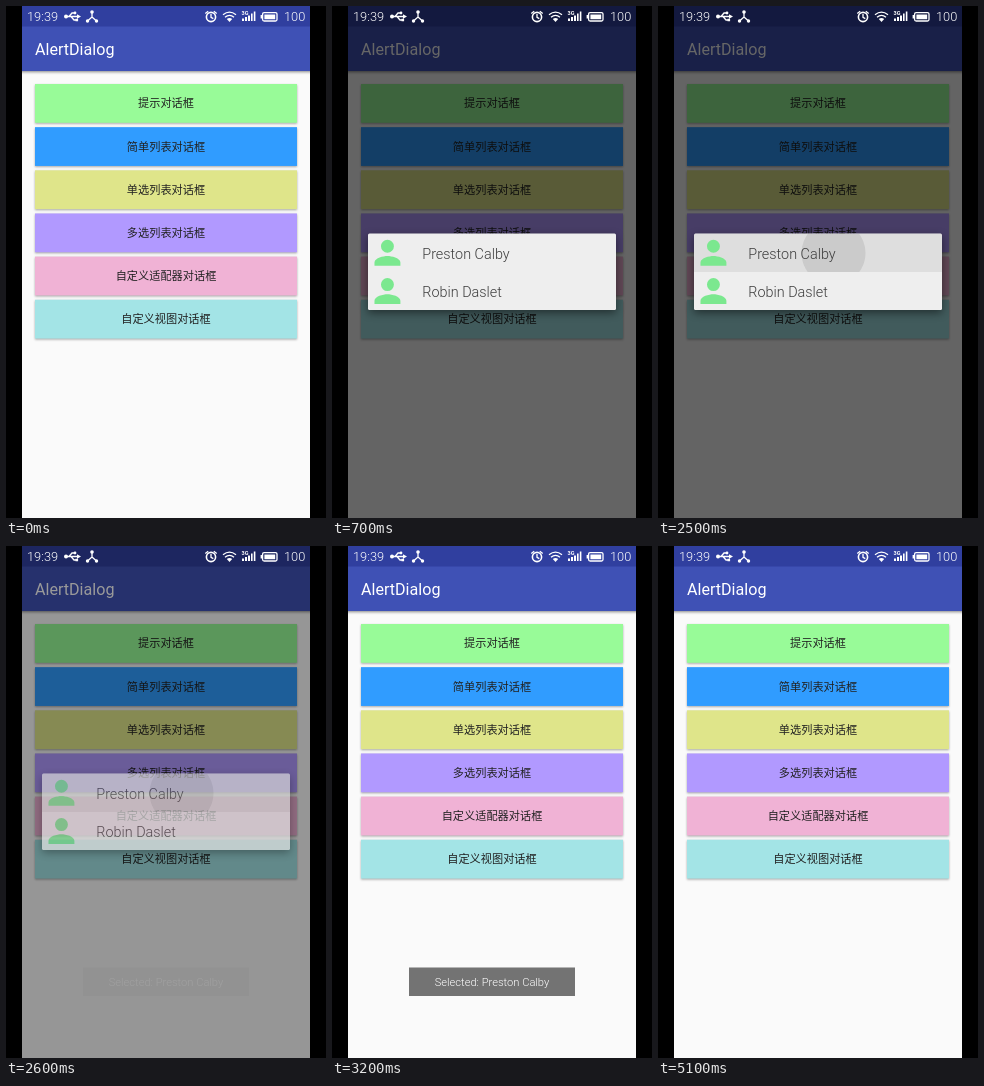
Write an HTML page that moves like this. It is 320 by 512 pixels and loops after 6 s.

```html
<!DOCTYPE html>
<html lang="zh">
<head>
<meta charset="utf-8">
<title>AlertDialog</title>
<style>
  html, body { margin: 0; height: 100%; overflow: hidden; background: #000; }
  svg { display: block; width: 100vw; height: 100vh; }
  text { font-family: Roboto, sans-serif; }
  .status { font-size: 12.8px; font-weight: 300; }
  .button { filter: drop-shadow(0 1px .8px #0005); }
  .label { font: 11.2px "Noto Sans CJK SC", "Noto Sans CJK", sans-serif; fill: #222; text-anchor: middle; }
  .item { font-size: 14.4px; font-weight: 300; fill: #3c3c3c; }
  .line { fill: none; stroke: #fff; stroke-width: 1.3; }
</style>
</head>
<body>
<svg viewBox="0 0 320 512">
  <defs>
    <path id="person" d="M12 12a4 4 0 1 0 0-8a4 4 0 0 0 0 8zm0 2c-2.67 0-8 1.34-8 4v2h16v-2c0-2.66-5.33-4-8-4z" fill="#7be88f"/>
    <clipPath id="rowClip"><rect x="36" y="228" width="248" height="38"/></clipPath>
  </defs>

  <rect width="320" height="512" fill="#fafafa"/>
  <rect x="10" width="300" height="65" fill="#3f51b5" style="filter:drop-shadow(0 1px 1.5px #0007)"/>
  <rect width="320" height="20.5" fill="#303f9f"/>
  <text x="29" y="49" font-size="16.1" fill="#fff">AlertDialog</text>
  <g id="buttons"></g>
  <rect id="dim" width="320" height="512" opacity="0"/>

  <g id="dialog" opacity="0">
    <rect x="36" y="227.5" width="248" height="76.5" rx="1.5" fill="#eee" style="filter:drop-shadow(0 3px 4px #0007)"/>
    <g clip-path="url(#rowClip)">
      <rect id="rowPress" x="36" y="228" width="248" height="38" opacity="0"/>
      <circle id="rowRipple" cx="175.5" cy="247" r="0" opacity=".085"/>
    </g>
    <use href="#person" transform="translate(36 227.3) scale(1.62)"/>
    <use href="#person" transform="translate(36 265.6) scale(1.62)"/>
    <text class="item" x="90.3" y="252.5">Preston Calby</text>
    <text class="item" x="90.3" y="290.8">Robin Daslet</text>
  </g>

  <g id="toast" opacity="0">
    <rect x="77" y="421.5" width="166" height="28.5" fill="#737373"/>
    <text x="160" y="440" font-size="11.15" font-weight="300" fill="#fff" text-anchor="middle">Selected: Preston Calby</text>
  </g>

  <g id="statusBar" fill="#fff">
    <text class="status" x="21" y="15">19:39</text>
    <text class="status" x="278" y="15">100</text>
    <!-- USB -->
    <path class="line" d="M60 10.5H72M63 10.5L66 7H68.5M65 10.5L68 14H70.5"/>
    <circle cx="60" cy="10.5" r="2"/><circle cx="69" cy="7" r="1.4"/>
    <path d="M71 8.2L75 10.5L71 12.8zM69.5 12.7h2.6v2.6h-2.6z"/>
    <!-- branching link -->
    <path class="line" d="M86 6V11L81.5 15M86 11L90.5 15"/>
    <circle cx="86" cy="6" r="1.8"/><circle cx="81.5" cy="15" r="1.7"/><circle cx="90.5" cy="15" r="1.7"/>
    <!-- alarm -->
    <circle class="line" cx="205" cy="11" r="4.6" style="stroke-width:1.6"/>
    <path class="line" d="M205 8V11.3L207.3 12.6M199.3 7.6L202.2 5.2M210.7 7.6L207.8 5.2"/>
    <!-- wifi -->
    <path class="line" d="M217 8.7Q223.5 3.4 230 8.7M219 11.2Q223.5 7.5 228 11.2"/>
    <path d="M220.8 13Q223.5 10.8 226.2 13L223.5 16z"/>
    <!-- signal -->
    <text x="235.5" y="9" font-size="5.5" font-weight="700">3G</text>
    <path d="M236 12.5h2V15h-2zM239 11h2v4h-2zM242 9.5h2V15h-2zM245 7.5h1.6V15H245zM247.8 5.5h1.6V15h-1.6z"/>
    <!-- battery -->
    <rect class="line" x="256.6" y="6.6" width="14.4" height="8.4" rx="1.5"/>
    <path d="M258.4 8.4h10.8v4.8h-10.8zM254.6 9h1.5v3.6h-1.5z"/>
  </g>

  <path d="M0 0H16V512H0zM304 0H320V512H304z"/>
</svg>

<script>
const LOOP = 6000, STEP = 100;
const $ = id => document.getElementById(id);
const set = (id, name, value) => $(id).setAttribute(name, value);

const buttons = [
  ["提示对话框", "#98fb98"],
  ["简单列表对话框", "#309cff"],
  ["单选列表对话框", "#dfe58a"],
  ["多选列表对话框", "#b199ff"],
  ["自定义适配器对话框", "#f0b2d5"],
  ["自定义视图对话框", "#a3e4e6"],
];
$("buttons").innerHTML = buttons.map(([label, color], i) => {
  const y = 78 + i * 43.15;
  const box = `x="29" y="${y}" width="262" height="38.8"`;
  const press = i === 4 ? `<rect id="buttonPress" ${box} opacity="0"/>` : "";
  return `<rect class="button" ${box} fill="${color}"/>${press}
    <text class="label" x="160" y="${y + 23.4}">${label}</text>`;
}).join("");

const ramp = (t, start, duration) => Math.min(1, Math.max(0, (t - start) / duration));
const decelerate = x => 1 - (1 - x) ** 2;
const accelerate = x => x * x;

function render(t) {
  set("buttonPress", "opacity", .1 * (ramp(t, 0, 200) - ramp(t, 350, 250)));
  set("dim", "opacity", .6 * (ramp(t, 477, 200) - ramp(t, 2550, 150)));
  set("dialog", "opacity", decelerate(ramp(t, 440, 220)) - ramp(t, 2550, 150));
  set("rowPress", "opacity", .065 * ramp(t, 1950, 400));
  set("rowRipple", "r", 32 * ramp(t, 1950, 550));
  set("toast", "opacity", decelerate(ramp(t, 2575, 520)) - accelerate(ramp(t, 4415, 550)));
}

function frame(now) {
  render(Math.floor((now % LOOP) / STEP) * STEP);
  requestAnimationFrame(frame);
}
requestAnimationFrame(frame);
</script>
</body>
</html>
```
